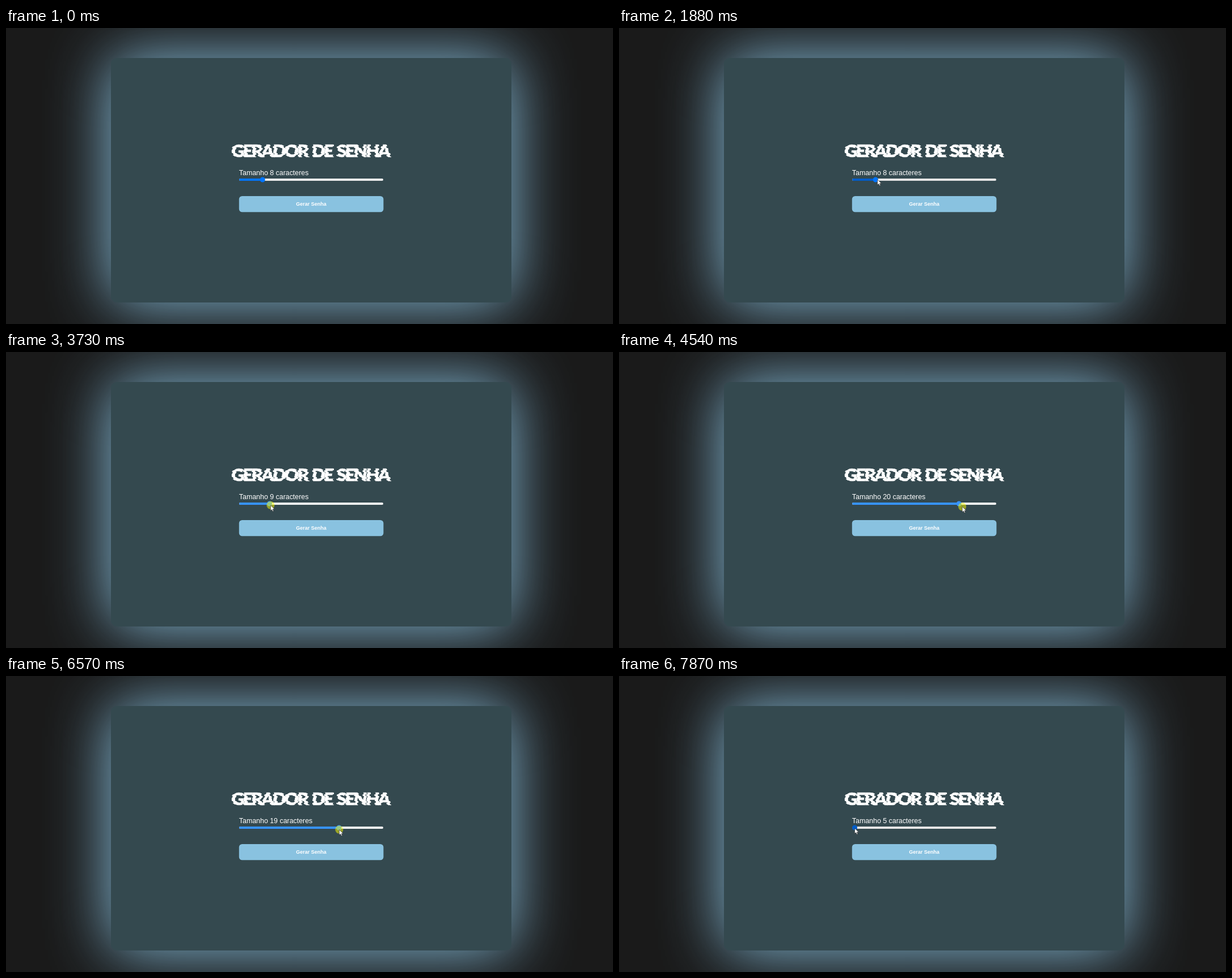
Animation, 1070 px wide and 523 px high, one loop 8 s. Source, as an HTML page:

```html
<!DOCTYPE html>
<html lang="pt">
<head>
<meta charset="utf-8">
<title>Gerador de senha</title>
<style>
  html, body { margin: 0; width: 100%; height: 100%; overflow: hidden; background: #1a1a1a; }
  #panel {
    position: absolute; left: 185px; top: 52.5px; width: 706px; height: 432.5px;
    border-radius: 11px; background: #34494f; box-shadow: 0 0 111px #8ac2e0;
  }
  svg { position: absolute; left: 0; top: 0; }
  text { fill: #fff; font-family: "Liberation Sans", Arial, sans-serif; }
  #title text { font: 900 31px Lato, sans-serif; word-spacing: 3px; stroke: #fff; stroke-width: .7px; }
  #label { font-size: 12.4px; }
  #action { font-size: 9px; font-weight: bold; text-anchor: middle; }
</style>
</head>
<body>
<div id="panel"></div>
<svg width="1070" height="523" viewBox="0 0 1070 523">
  <g id="title"></g>
  <text id="label" x="410.8" y="260"></text>
  <rect id="track" x="411" y="266" width="254" height="4" rx="2"/>
  <rect id="fill" x="411" y="266" height="4" rx="2"/>
  <circle id="thumb" cy="268" r="4.5"/>
  <rect x="410.8" y="297" width="254.6" height="28.3" rx="5.5" fill="#89c2e0"/>
  <text id="action" x="538" y="314">Gerar Senha</text>
  <g id="pointer">
    <circle id="press" r="7" fill="#ff0" opacity=".5"/>
    <path d="M0 0V9.6L2.2 7.6L3.8 11L5.4 10.3L3.9 7H7Z" fill="#fff" stroke="#222" stroke-width=".6"/>
  </g>
</svg>
<script>
const $ = id => document.getElementById(id);
const LOOP = 8000, ENTER = 1050, PRESS = 2220, RELEASE = 7870;
const STEP = 68.4, MIN_X = 415.5, UNIT = 12.25;
const ORIGIN = { x: 1075, y: 525 };

// Each move runs in even steps; power above 1 slows down towards the end
const MOVES = [
  { start: ENTER, steps: 12, x: 460, y: 266, power: 1.6 },
  { start: 1880, steps: 3, x: 452.5, y: 269, power: 2.2 },
  { start: PRESS, steps: 11, x: 416, y: 269, power: 1 },
  { start: 3520, steps: 12, x: 556, y: 274, power: 1.1 },
  { start: 4330, steps: 13, x: 658.5, y: 272.5, power: 1.77 },
  { start: 6090, steps: 23, x: 415.5, y: 269, power: .81 }
];

const COLORS = {
  idle: ["#efefef", "#0075ff"],
  hover: ["#e5e5e5", "#005cc8"],
  active: ["#f5f5f5", "#3793ff"]
};

// The title is cut into horizontal bands, each pushed sideways
function buildTitle() {
  const height = 3, top = 203;
  let html = "";
  for (let i = 0; i < 9; i++) {
    const dx = Math.sin(i * 2.4) * 1.1;
    html += `
      <clipPath id="band${i}"><rect x="380" y="${top + i * height}" width="320" height="${height}"/></clipPath>
      <g clip-path="url(#band${i})"><text x="${397.5 + dx}" y="227.8">GERADOR DE SENHA</text></g>`;
  }
  $("title").innerHTML = html;
  const text = $("title").querySelector("text");
  const gap = (280.5 - text.getComputedTextLength()) / (text.textContent.length - 1);
  $("title").style.letterSpacing = gap + "px";
}

function pointerAt(time) {
  let { x, y } = ORIGIN;
  for (const move of MOVES) {
    if (time < move.start) break;
    const step = Math.floor((time - move.start) / STEP) + 1;
    const k = 1 - (1 - Math.min(1, step / move.steps)) ** move.power;
    x += (move.x - x) * k;
    y += (move.y - y) * k;
  }
  return { x, y };
}

function draw(time) {
  const { x, y } = pointerAt(time);
  const dragging = time >= PRESS && time < RELEASE;
  const value = time < PRESS ? 8
    : Math.min(25, Math.max(5, Math.round((x - MIN_X) / UNIT) + 5));
  const thumbX = MIN_X + (value - 5) * UNIT;
  const over = x > 411 && x < 665 && y < 273;
  const state = dragging ? "active" : over ? "hover" : "idle";
  const onThumb = dragging || Math.abs(x - thumbX) < 2.5;
  const [trackColor, fillColor] = COLORS[state];

  $("label").textContent = `Tamanho ${value} caracteres`;
  $("track").setAttribute("fill", trackColor);
  $("fill").setAttribute("fill", fillColor);
  $("fill").setAttribute("width", thumbX - 411);
  $("thumb").setAttribute("cx", thumbX);
  $("thumb").setAttribute("fill", onThumb ? fillColor : COLORS.idle[1]);
  $("pointer").setAttribute("transform", `translate(${x} ${y})`);
  $("press").style.display = dragging ? "" : "none";
}

buildTitle();
const began = performance.now();
function tick() {
  draw((performance.now() - began) % LOOP);
  requestAnimationFrame(tick);
}
tick();
</script>
</body>
</html>
```
